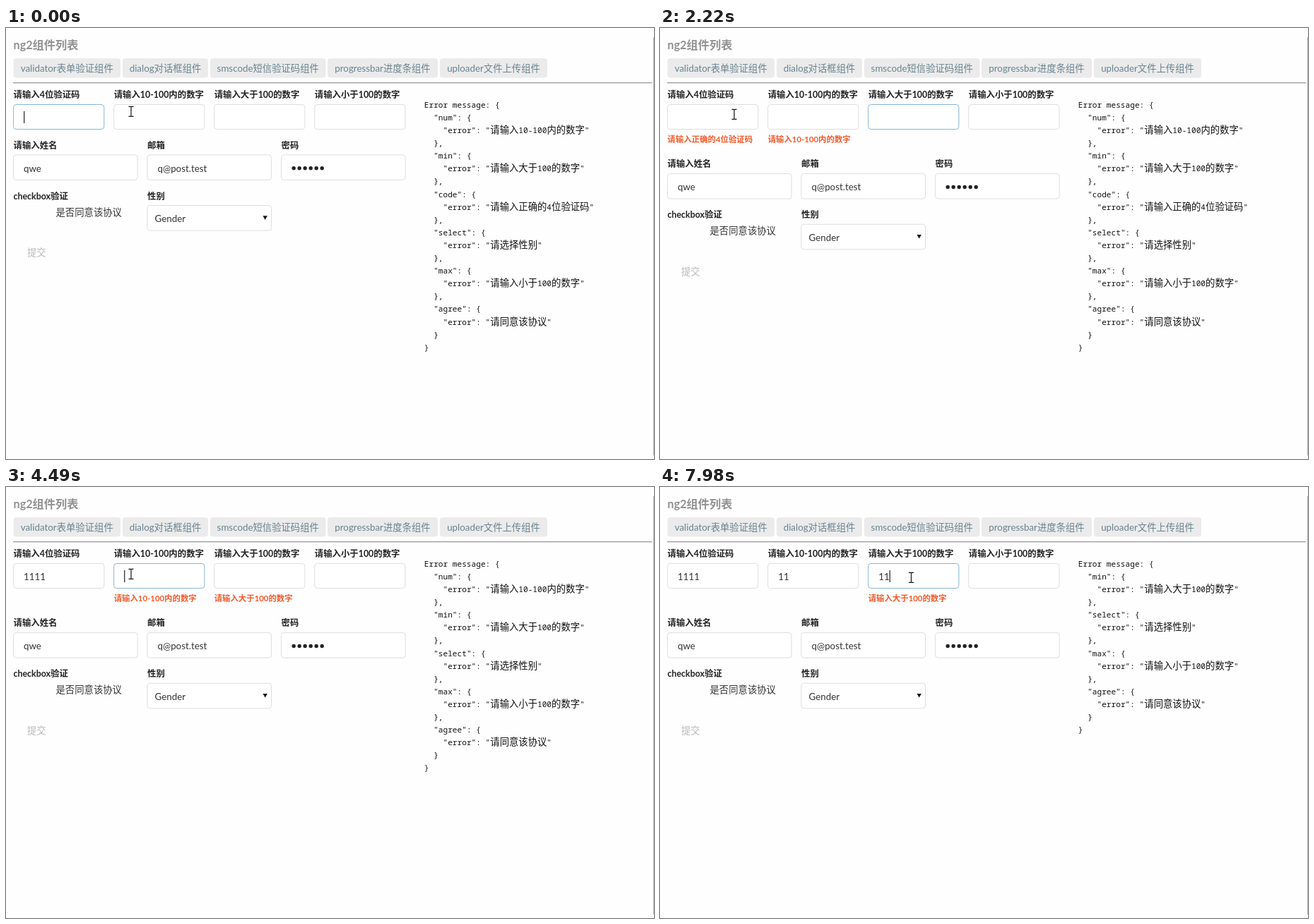
An HTML page that plays this animation: 917 by 611 pixels, repeating every 8 s.

```html
<!DOCTYPE html>
<html lang="zh-CN">
<head>
<meta charset="utf-8">
<title>ng2组件列表</title>
<style>
  html, body { margin: 0; width: 100%; height: 100%; overflow: hidden; background: #fefefe; }
  svg { display: block; font: 13.35px Lato, "Noto Sans CJK SC", "Noto Sans CJK", sans-serif; }
  text { white-space: pre; fill: #333; }
  .title { font-size: 16.2px; font-weight: 700; fill: #919191; }
  .tab { text-anchor: middle; fill: #688390; }
  .label { font-size: 12.4px; font-weight: 700; fill: #222; }
  .error { font-size: 11.4px; font-weight: 700; fill: #f15a2b; }
  .submit { fill: #b9b9b9; }
  .box { fill: #fff; stroke: #dedede; }
  .box.focus { stroke: #85b7d9; }
  .log text { font: 11.13px "Noto Sans Mono", "Liberation Mono", monospace; fill: #111; }
  .log .han { font: 13.35px "Noto Sans CJK SC", "Noto Sans CJK", sans-serif; }
</style>
</head>
<body>
<svg id="stage" width="917" height="611" viewBox="0 0 917 611"></svg>
<script>
const LOOP = 8000;
const DIGIT = 7.743;
const ERROR_SHIFT = 26.7;
const stage = document.getElementById('stage');

function add(parent, tag, attrs = {}, content = '') {
  const node = document.createElementNS('http://www.w3.org/2000/svg', tag);
  for (const [key, value] of Object.entries(attrs)) node.setAttribute(key, value);
  node.textContent = content;
  return parent.appendChild(node);
}
const write = (parent, x, y, content, style = '') =>
  add(parent, 'text', { x, y, class: style }, content);
const box = (parent, x, y, width, height) =>
  add(parent, 'rect', { x, y, width, height, rx: 3.8, class: 'box' });

// Header and tabs
write(stage, 10.5, 30, 'ng2组件列表', 'title');
const tabs = [
  [10.5, 162, 'validator表单验证组件'],
  [165, 286, 'dialog对话框组件'],
  [289, 452.5, 'smscode短信验证码组件'],
  [455, 611, 'progressbar进度条组件'],
  [614, 766, 'uploader文件上传组件'],
];
for (const [left, right, name] of tabs) {
  add(stage, 'rect', { x: left, y: 43, width: right - left, height: 27.5, rx: 4, fill: '#ebebeb' });
  write(stage, (left + right) / 2, 62.3, name, 'tab');
}
add(stage, 'rect', { x: 10, y: 77, width: 904, height: 1.3, fill: '#999' });
add(stage, 'path', { d: 'M916.5 13V606', stroke: '#aaa' });

// Validated fields
const fields = {};
[
  ['code', '请输入4位验证码', '请输入正确的4位验证码'],
  ['num', '请输入10-100内的数字', '请输入10-100内的数字'],
  ['min', '请输入大于100的数字', '请输入大于100的数字'],
  ['max', '请输入小于100的数字', '请输入小于100的数字'],
].forEach(([key, label, message], i) => {
  const x = 10.6 + 142.05 * i;
  write(stage, x, 99.2, label, 'label');
  fields[key] = {
    textX: x + 14.5,
    message,
    box: box(stage, x, 108.5, 128.2, 35),
    value: write(stage, x + 14.5, 131.8, ''),
    error: write(stage, x, 162.4, message, 'error'),
  };
});

// Rows below, pushed down by error lines
const lower = add(stage, 'g');
write(lower, 10.5, 170.7, '请输入姓名', 'label');
write(lower, 200, 170.7, '邮箱', 'label');
write(lower, 389.5, 170.7, '密码', 'label');
for (const x of [10.5, 199.9, 389.6]) box(lower, x, 179.8, 175.6, 35.6);
write(lower, 25, 203.6, 'qwe');
write(lower, 214.5, 203.6, 'q@post.test');
for (let i = 0; i < 6; i++) {
  add(lower, 'circle', { cx: 407.2 + 8 * i, cy: 198.8, r: 2.7, fill: '#222' });
}
write(lower, 10.5, 242.7, 'checkbox验证', 'label');
write(lower, 70.5, 265.8, '是否同意该协议');
write(lower, 200, 242.7, '性别', 'label');
box(lower, 199.9, 251.5, 175.6, 35.6);
write(lower, 210.6, 275, 'Gender');
add(lower, 'path', { d: 'M363.5 266.3h6.4l-3.2 5.6z', fill: '#111' });
write(lower, 30, 323, '提交', 'submit');

const log = add(stage, 'g', { class: 'log' });
const caret = add(stage, 'rect', { y: 118, width: 1.2, height: 17, fill: '#222' });
const pointer = add(stage, 'path', {
  d: 'M-3.5 -7.7H-1Q0 -7.7 0 -6.7Q0 -7.7 1 -7.7H3.5M0 -7V6M-3.5 6.3H-1Q0 6.3 0 5.3Q0 6.3 1 6.3H3.5',
  fill: 'none', stroke: '#111', 'stroke-width': 1.2,
});

const messages = {
  num: fields.num.message,
  min: fields.min.message,
  code: fields.code.message,
  select: '请选择性别',
  max: fields.max.message,
  agree: '请同意该协议',
};

function drawLog(solved) {
  const invalid = Object.fromEntries(
    Object.entries(messages)
      .filter(([key]) => !solved.includes(key))
      .map(([key, error]) => [key, { error }]));
  const lines = ('Error message: ' + JSON.stringify(invalid, null, 2)).split('\n');
  log.replaceChildren();
  lines.forEach((line, row) => {
    const body = line.trimStart();
    const indent = line.length - body.length;
    const text = write(log, 591.8 + 6.68 * indent, 112.8 + 18.1 * row, '');
    for (const run of body.match(/[\u4e00-\u9fff]+|[^\u4e00-\u9fff]+/g)) {
      add(text, 'tspan', { class: run[0] >= '\u4e00' ? 'han' : '' }, run);
    }
  });
}

// Each step changes part of the state from its time (ms) onwards
const steps = [
  [0, { focus: 'code', caret: true, pointer: [177, 119], errors: [], solved: [], code: '', num: '', min: '' }],
  [140, { focus: 'num', errors: ['code'] }],
  [820, { caret: false, pointer: [184, 123] }],
  [960, { pointer: [218, 130] }],
  [1100, { pointer: [262, 130] }],
  [1230, { caret: true, pointer: [295, 126] }],
  [1360, { pointer: [304, 124] }],
  [1640, { focus: 'min', errors: ['code', 'num'] }],
  [1920, { pointer: [270, 125] }],
  [2070, { pointer: [180, 124] }],
  [2220, { caret: false, pointer: [105, 123] }],
  [2370, { pointer: [87, 124] }],
  [2650, { focus: 'code', caret: true, errors: ['code', 'num', 'min'] }],
  [3360, { code: '1' }],
  [3500, { code: '11' }],
  [3650, { code: '111' }],
  [3790, { code: '1111', errors: ['num', 'min'], solved: ['code'] }],
  [3940, { pointer: [140, 125] }],
  [4080, { pointer: [177, 124] }],
  [4360, { focus: 'num' }],
  [4950, { num: '1' }],
  [5370, { num: '112', pointer: [179, 124] }],
  [5500, { pointer: [230, 124] }],
  [5640, { pointer: [281, 123] }],
  [5920, { caret: false, pointer: [264, 122] }],
  [6040, { pointer: [252.5, 121] }],
  [6450, { caret: true, num: '11', errors: ['min'], solved: ['code', 'num'] }],
  [7020, { pointer: [300, 136] }],
  [7160, { pointer: [342, 145] }],
  [7290, { pointer: [355.5, 129] }],
  [7430, { focus: 'min' }],
  [7830, { min: '1' }],
  [7980, { min: '11' }],
];

function draw(state) {
  for (const [key, field] of Object.entries(fields)) {
    field.box.classList.toggle('focus', key === state.focus);
    field.value.textContent = state[key] || '';
    field.error.style.display = state.errors.includes(key) ? '' : 'none';
  }
  const shift = state.errors.length ? ERROR_SHIFT : 0;
  lower.setAttribute('transform', `translate(0 ${shift})`);
  caret.setAttribute('x', fields[state.focus].textX + DIGIT * state[state.focus].length);
  caret.style.display = state.caret ? '' : 'none';
  pointer.setAttribute('transform', `translate(${state.pointer})`);
  drawLog(state.solved);
}

const start = performance.now();
let shown = 0;
function tick() {
  const time = (performance.now() - start) % LOOP;
  const passed = steps.filter(([at]) => at <= time);
  if (passed.length !== shown) {
    shown = passed.length;
    draw(Object.assign({}, ...passed.map(([, change]) => change)));
  }
  requestAnimationFrame(tick);
}
tick();
</script>
</body>
</html>
```
